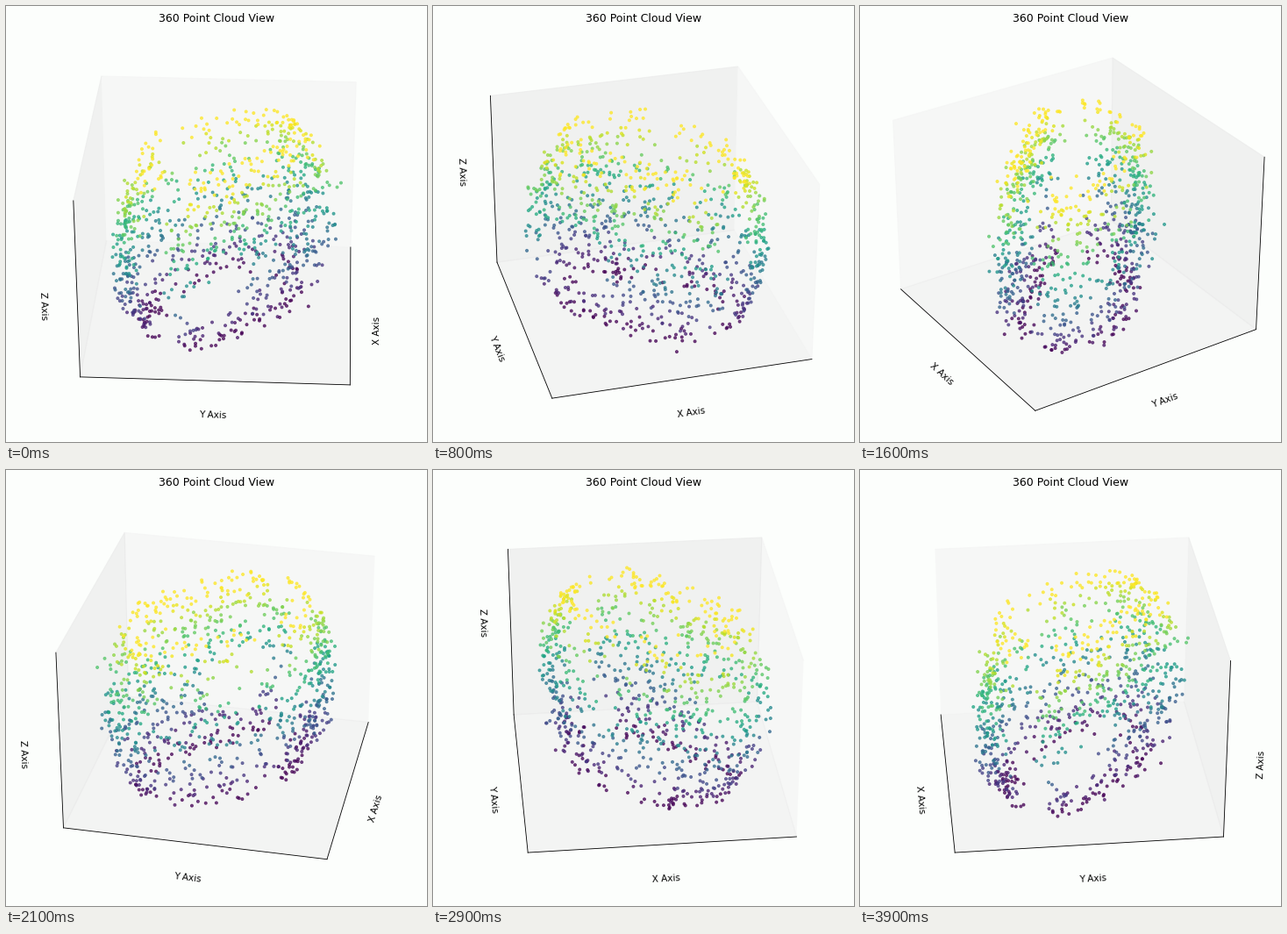
Recreate the animation shown at these times as a matplotlib script. Size 480 by 497 pixels, loop 4 s.

```python
import numpy as np
import matplotlib.pyplot as plt
from matplotlib.animation import FuncAnimation

W, H, DPI = 480, 497, 75
SIDE = 465
FRAMES, INTERVAL = 40, 100
START, STEP = 3, 9
BACKGROUND = "#fcfefc"
COUNT = 1000

plt.rcParams["font.family"] = "DejaVu Sans"


def in_hole(p, q, z):
    """Bare patches on the two faces of the shell."""
    front = (q > 0) & (((p + 0.42) / 0.3) ** 2 + ((z + 0.3) / 0.42) ** 2 < 1)
    back = (q < 0) & (((p + 0.12) / 0.15) ** 2 + ((z - 0.72) / 0.24) ** 2 < 1)
    return front | back


def make_cloud(rng):
    """Hollow shell, flat on one face and bulging on the other."""
    n = 2 * COUNT
    z = rng.uniform(-1, 1, n)
    flat = rng.random(n) < 0.45
    u = rng.uniform(-1, 1, n)
    angle = 1.75 * u
    p = np.where(flat, 0.88 * u, 0.95 * np.sin(angle))
    q = np.where(flat, 0.45 - 0.08 * u**2, -0.48 * np.cos(angle))
    p = p * np.sqrt(1 - 0.55 * z**2) + rng.normal(0, 0.02, n)
    q = q * (1 - 0.2 * z**2) + rng.normal(0, 0.055, n)
    keep = np.flatnonzero(~in_hole(p, q, z))[:COUNT]
    p, q, z = p[keep], q[keep], z[keep]
    # The long side of the shell runs along the x = -y diagonal.
    return (q - p) / np.sqrt(2), (q + p) / np.sqrt(2), z


fig = plt.figure(figsize=(W / DPI, 6.6267), dpi=DPI, facecolor=BACKGROUND)
ax = fig.add_axes([7.3 / W, 7.9 / H, SIDE / W, SIDE / H], projection="3d")
ax.set_facecolor(BACKGROUND)

x, y, z = make_cloud(np.random.default_rng(7))
ax.scatter(x, y, z, c=z, cmap="viridis", vmin=-0.9, vmax=0.8, s=8, alpha=0.7)

ax.set(xlim=(-1, 1), ylim=(-1, 1), zlim=(-1, 1),
       xticks=[], yticks=[], zticks=[],
       xlabel="X Axis", ylabel="Y Axis", zlabel="Z Axis")
ax.set_title("360 Point Cloud View")
ax.grid(False)


def update(i):
    ax.view_init(elev=30, azim=START + STEP * i)
    return ()


anim = FuncAnimation(fig, update, frames=FRAMES, interval=INTERVAL,
                     repeat=True, repeat_delay=0, blit=False)
plt.show()
```
